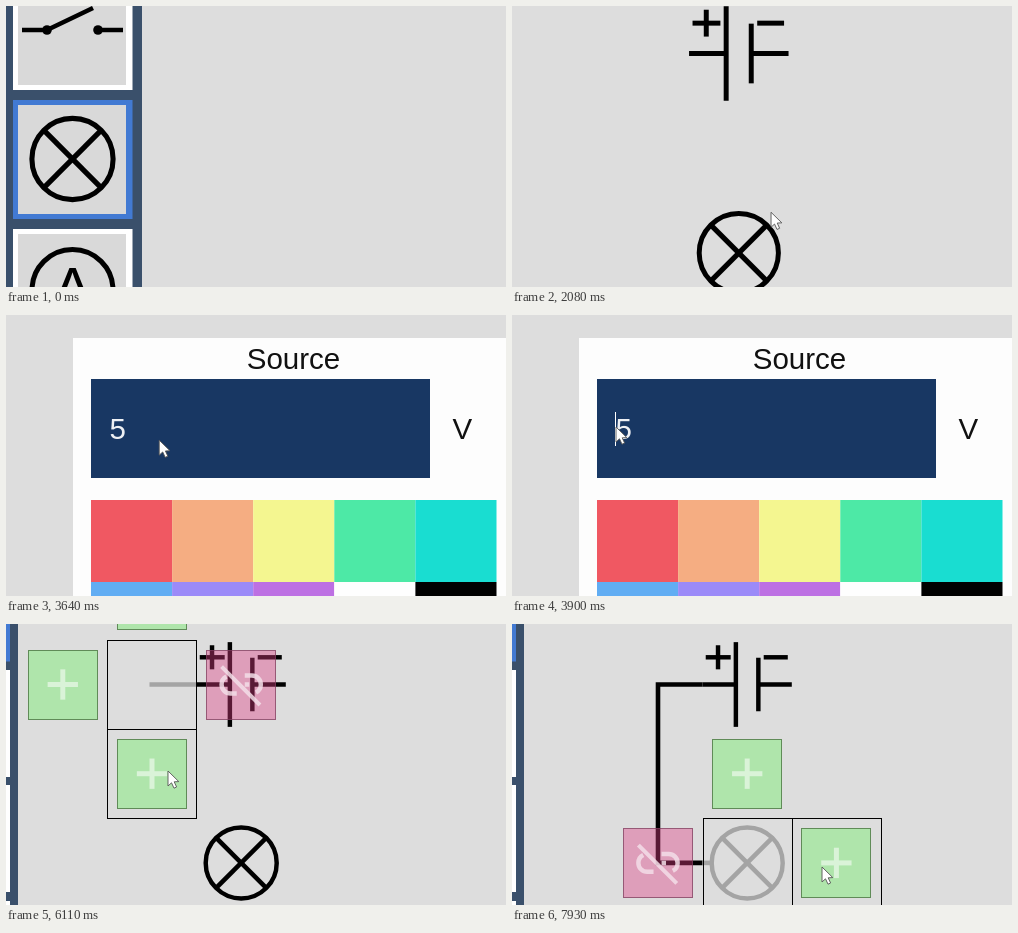
An HTML page with a canvas that plays this animation: 500x281 px, repeating every 8 s.

```html
<!DOCTYPE html>
<html lang="en">
<head>
<meta charset="utf-8">
<title>Circuit editor</title>
<style>
html, body { margin: 0; width: 100%; height: 100%; overflow: hidden; background: #ddd; }
canvas { display: block; }
</style>
</head>
<body>
<canvas id="stage" width="500" height="281"></canvas>
<script>
const g = document.getElementById('stage').getContext('2d');
const LOOP = 8000;
const BLACK = '#000', GREY = '#a4a4a4', NAVY = '#3a506b', BLUE = '#427ad3';
const FONT = '"Liberation Sans", Arial, sans-serif';

function rect(x, y, w, h, color) {
  g.fillStyle = color;
  g.fillRect(x, y, w, h);
}

function line(points, color, width) {
  g.strokeStyle = color;
  g.lineWidth = width;
  g.beginPath();
  points.forEach(([x, y]) => g.lineTo(x, y));
  g.stroke();
}

function disc(x, y, r, color) {
  g.fillStyle = color;
  g.beginPath();
  g.arc(x, y, r, 0, 7);
  g.fill();
}

function ring(x, y, r, color, width) {
  g.strokeStyle = color;
  g.lineWidth = width;
  g.beginPath();
  g.arc(x, y, r, 0, 7);
  g.stroke();
}

function text(str, x, y, size, color, align = 'left') {
  g.font = size + 'px ' + FONT;
  g.fillStyle = color;
  g.textAlign = align;
  g.fillText(str, x, y);
}

// Runs draw in a space where one grid cell is 100 units, centred on 0,0.
function inCell(x, y, size, draw) {
  g.save();
  g.translate(x, y);
  g.scale(size / 100, size / 100);
  draw();
  g.restore();
}

function lamp(x, y, size, color) {
  inCell(x, y, size, () => {
    ring(0, 0, 39.8, color, 5);
    line([[-28, -28], [28, 28]], color, 5.2);
    line([[28, -28], [-28, 28]], color, 5.2);
  });
}

function battery(x, y, size, color) {
  inCell(x, y, size, () => {
    [
      [[-50, 0], [-13, 0]], [[13, 0], [50, 0]],
      [[-12.7, -47.5], [-12.7, 47.5]], [[12.5, -30], [12.5, 30]],
      [[-46.5, -30.5], [-18.5, -30.5]], [[-32.7, -44], [-32.7, -17]],
      [[18.5, -30.5], [45.5, -30.5]]
    ].forEach(p => line(p, color, 5));
  });
}

function outline(x, y, size) {
  g.strokeStyle = BLACK;
  g.lineWidth = 1;
  g.strokeRect(Math.round(x - size / 2) + 0.5, Math.round(y - size / 2) + 0.5,
    Math.round(size), Math.round(size));
}

function tile(x, y, size, fill, edge) {
  const s = Math.round(size * 0.79), left = Math.round(x - s / 2), top = Math.round(y - s / 2);
  rect(left, top, s, s, fill);
  g.strokeStyle = edge;
  g.lineWidth = 1;
  g.strokeRect(left + 0.5, top + 0.5, s - 1, s - 1);
}

function addTile(x, y, size) {
  tile(x, y, size, 'rgba(106,241,96,.4)', 'rgba(70,110,60,.75)');
  const color = '#daf3d8', a = size * 0.17, w = size * 0.056;
  line([[x - a, y], [x + a, y]], color, w);
  line([[x, y - a], [x, y + a]], color, w);
}

function unlinkTile(x, y, size) {
  tile(x, y, size, 'rgba(223,63,133,.4)', 'rgba(120,60,90,.7)');
  inCell(x, y, size, () => {
    const color = 'rgba(244,222,232,.85)';
    g.strokeStyle = color;
    g.lineWidth = 5;
    g.beginPath();
    g.moveTo(-5, 10);
    g.lineTo(-12, 10);
    g.arc(-12, 0, 10, Math.PI / 2, Math.PI * 1.35);
    g.moveTo(4, -10);
    g.lineTo(12, -10);
    g.arc(12, 0, 10, -Math.PI / 2, Math.PI * 0.35);
    g.moveTo(4, 0);
    g.lineTo(9, 0);
    g.stroke();
    line([[-22, -20], [21, 23]], color, 4.5);
  });
}

function pointer([x, y]) {
  g.beginPath();
  [[0, 0], [0, 15], [3.5, 11.8], [6, 17.2], [8.6, 16], [6.2, 10.8], [10.8, 10.6]]
    .forEach(([a, b]) => g.lineTo(x + a, y + b));
  g.closePath();
  g.fillStyle = '#fff';
  g.fill();
  g.strokeStyle = '#555';
  g.lineWidth = 0.9;
  g.stroke();
}

// Eased position along stops of [time, x, y].
function along(stops, t) {
  let a = stops[0];
  for (const b of stops) {
    if (t < b[0]) {
      const p = Math.max(0, (t - a[0]) / (b[0] - a[0] || 1)), e = p * p * (3 - 2 * p);
      return [a[1] + (b[1] - a[1]) * e, a[2] + (b[2] - a[2]) * e];
    }
    a = b;
  }
  return [a[1], a[2]];
}

function card(y, border) {
  rect(7, y, 119.5, 119, border);
  rect(12, y + 5, 108, 109, '#d9d9d9');
}

function palette() {
  rect(0, 0, 136, 281, NAVY);
  card(-35, '#fff');
  card(94, BLUE);
  card(223, '#fff');
  line([[16, 24], [41, 24], [87, 2]], BLACK, 4.5);
  line([[92, 24], [117, 24]], BLACK, 4.5);
  disc(41, 24, 4.8, BLACK);
  disc(92, 24, 4.8, BLACK);
  lamp(66.5, 153, 102, BLACK);
  ring(66.5, 284, 40.5, BLACK, 5);
  text('A', 66.5, 303, 59, BLACK, 'center');
}

const DRAG = [[390, 60, 170], [800, 269, 191], [1050, 269, 191], [1500, 266, 246],
  [1950, 266, 246], [2400, 232, 52], [2800, 232, 52], [3200, 392, 247]];

function placing(t) {
  const cell = 99.5, pos = along(DRAG, t);
  const held = t < 1600, picked = t >= 2500;
  battery(226.8, 47.5, cell, picked ? GREY : BLACK);
  if (held) {
    const x = 226.8 + cell * Math.floor((pos[0] - 177) / cell);
    const y = 147.5 + cell * Math.floor((pos[1] - 97.5) / cell);
    lamp(x, y, cell, GREY);
    outline(x, y, cell);
  } else {
    lamp(226.8, 247, cell, BLACK);
  }
  if (picked) {
    outline(226.8, 47.5, cell);
    addTile(127, 47.5, cell);
    addTile(326.5, 47.5, cell);
  }
  if (t < 3200) pointer(pos);
}

const SWATCHES = ['#f05862', '#f5ad82', '#f4f690', '#4de9a6', '#19ddd1',
  '#61adf3', '#9b8af8', '#bd70e3', '#fefefe', '#000'];

function dialog(t) {
  rect(67, 23, 433, 258, '#fdfdfd');
  text('Source', 287.5, 54, 29.5, '#111', 'center');
  rect(85, 64, 339, 99, '#183763');
  SWATCHES.forEach((c, i) => rect(85 + (i % 5) * 81.1, i < 5 ? 185 : 267, 81.1, i < 5 ? 82 : 14, c));
  text('V', 446.5, 124, 29.5, '#111');
  const typed = t >= 4800;
  text(typed ? '25' : '5', 103.5, 124, 29.5, '#eef0f4');
  if (t >= 3830 && (t < 4330 || typed)) rect(typed ? 120 : 103, 97, 1, 34, '#fff');
  if (t < 4550) pointer(along([[3510, 190, 135], [3800, 104, 112]], t));
}

// Each step: start, selected cell, linked cell, free cells.
const STEPS = [
  [5330, [1, 0], null, [[0, 0], [2, 0]]],
  [5720, [0, 0], [1, 0], [[-1, 0], [0, -1], [0, 1]]],
  [6250, [0, 1], [0, 0], [[-1, 1], [1, 1], [0, 2]]],
  [6750, [0, 2], [0, 1], [[-1, 2], [1, 2]]],
  [7350, [1, 2], [0, 2], [[1, 1], [2, 2]]]
];
const WIRING = [[5330, 215, 90], [5650, 150, 66], [5760, 150, 66], [6050, 162, 147],
  [6280, 162, 147], [6600, 158, 238], [6800, 158, 238], [7200, 236, 242],
  [7400, 236, 242], [7850, 310, 243]];

function wiring(t) {
  const cell = 89.2, at = ([i, j]) => [146 + cell * i, 60.5 + cell * j];
  const n = STEPS.filter(s => t >= s[0]).length - 1;
  const [, sel, linked, free] = STEPS[n];
  const pos = along(WIRING, t);

  rect(0, 0, 12, 281, NAVY);
  rect(0, 0, 4, 37.5, BLUE);
  [[46, 107], [161, 107], [277, 10]].forEach(([y, h]) => rect(0, y, 4, h, '#fff'));

  const [bx, by] = at([1, 0]), [lx, ly] = at([1, 2]);
  battery(bx, by, cell, n === 0 ? GREY : BLACK);
  lamp(lx, ly, cell, n === 4 ? GREY : BLACK);

  const edgeX = bx - cell / 2;
  if (n === 1) line([[edgeX, by], [143.5, by]], GREY, 4.6);
  if (n > 1) {
    const low = n === 2 ? 1 : 2;
    const y = at([0, low])[1], join = y - cell / 2;
    line([[edgeX, by], [146, by], [146, n === 4 ? y : join], ...(n === 4 ? [[edgeX, y]] : [])], BLACK, 4.6);
    line(n === 4 ? [[edgeX, y], [lx - 35, y]] : [[146, join], [146, y + 2.5]], GREY, 4.6);
  }

  outline(...at(sel), cell);
  for (const c of free) {
    const [x, y] = at(c);
    addTile(x, y, cell);
    if (Math.max(Math.abs(pos[0] - x), Math.abs(pos[1] - y)) < cell / 2) outline(x, y, cell);
  }
  if (linked) unlinkTile(...at(linked), cell);
  pointer(pos);
}

function frame(now) {
  const t = now % LOOP;
  rect(0, 0, 500, 281, '#ddd');
  if (t < 390) palette();
  else if (t < 3510) placing(t);
  else if (t < 5330) dialog(t);
  else wiring(t);
  requestAnimationFrame(frame);
}
requestAnimationFrame(frame);
</script>
</body>
</html>
```
